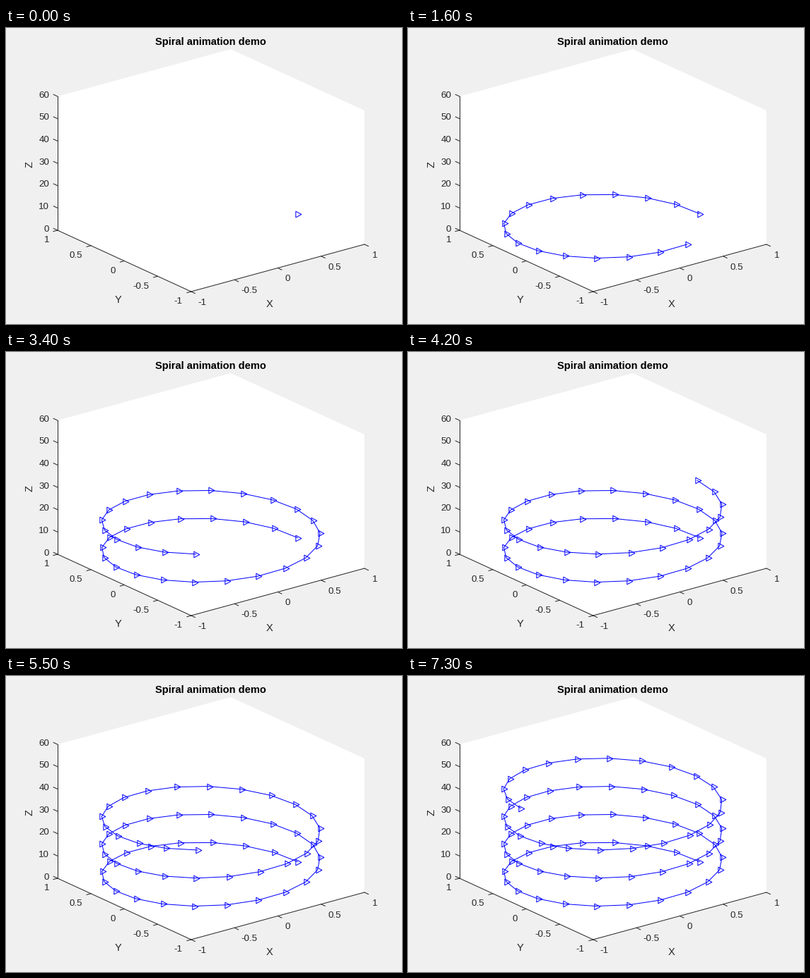
Write a matplotlib script that moves like this. It is 560 px wide and 420 px high and loops after 7400 ms.

```python
import numpy as np
import matplotlib.pyplot as plt
from matplotlib.animation import FuncAnimation
from matplotlib.markers import MarkerStyle
from matplotlib.patches import Polygon
from matplotlib.path import Path

W, H, DPI = 560, 420, 100
PX = 72 / DPI                      # points per pixel
FRAMES, INTERVAL = 74, 100
STEP = 0.3                         # radians between spiral points
INK = "#262626"

plt.rcParams["font.family"] = "Liberation Sans"
fig = plt.figure(figsize=(W / DPI, H / DPI), dpi=DPI, facecolor="#f0f0f0")
ax = fig.add_axes([0, 0, 1, 1])
ax.set(xlim=(0, W), ylim=(H, 0))
ax.axis("off")


def project(x, y, z):
    """Orthographic view of the data box, in pixels."""
    return (289.8 + 122.5 * x - 94.5 * y,
            297 - 33.5 * x - 43.5 * y - 190 / 60 * z)


def line(xs, ys, color=INK, width=1.0, **kw):
    return ax.plot(xs, ys, color=color, lw=width * PX, **kw)[0]


def label(x, y, text, size=13.33, **kw):
    kw = {"color": INK, "ha": "center", "va": "baseline"} | kw
    return ax.text(x, y, text, fontsize=size * PX, **kw)


def edge(a, b):
    line(*zip(project(*a), project(*b)), solid_capstyle="projecting")


def tick(point, dx, dy):
    x, y = project(*point)
    line([x, x + dx], [y, y + dy])


def draw_box():
    low, high = (-1, 1, 0), (-1, 1, 60)
    front, right = (-1, -1, 0), (1, -1, 0)
    outline = [high, (1, 1, 60), (1, -1, 60), right, front, low]
    ax.add_patch(Polygon([project(*c) for c in outline], fc="white", lw=0))
    for a, b in ((low, high), (low, front), (front, right)):
        edge(a, b)

    for k in range(7):
        tick((-1, 1, 10 * k), -5.6, -2.6)
        label(61, 288.6 - 190 / 6 * k, f"{10 * k}", ha="right")
    for k in range(5):
        v = k / 2 - 1
        tick((v, -1, 0), 5.6, 2.6)
        label(271.2 + 61.6 * k, 393 - 16.8 * k, f"{v:g}", ha="left")
        tick((-1, v, 0), -5.9, 1.6)
        label(249 - 47 * k, 391.4 - 21.75 * k, f"{v:g}", ha="right")

    label(373, 395.5, "X", 14.67)
    label(159, 390.4, "Y", 14.67)
    label(41, 193, "Z", 14.67, rotation=90, va="center", ha="right")
    label(289.5, 24, "Spiral animation demo", 14.67,
          color="black", weight="bold", zorder=6)


def draw_toolbar():
    """Faint row of axes tools; returns its artists."""
    parts = []
    y = 20

    def stroke(xs, ys):
        parts.append(line(xs, ys, color="#d6d6d6", width=1.3, zorder=5))

    def ring(x, y, r, sides=40, turn=0):
        a = np.linspace(0, 2 * np.pi, sides + 1) + turn
        stroke(x + r * np.cos(a), y + r * np.sin(a))

    def square(x, y, half):
        ring(x, y, half * 2 ** 0.5, 4, np.pi / 4)

    def export(x):
        square(x, y + 2, 5)
        stroke([x, x], [y - 7, y + 2])

    def brush(x):
        square(x, y - 4, 2.5)
        ring(x, y + 3, 6, 3, -np.pi / 2)

    def data_tip(x):
        square(x, y, 7)
        for dy in (-2.5, 2.5):
            stroke([x - 4, x + 4], [y + dy, y + dy])

    def rotate(x):
        ring(x, y, 7)
        ring(x, y, 4, 6, np.pi / 2)

    def pan(x):
        ring(x, y + 3, 4.5)
        for k in range(-2, 3):
            stroke([x + 1.5 * k, x + 2.8 * k], [y, y - 7 + abs(k)])

    def zoom_out(x):
        ring(x - 1.5, y - 1.5, 5.5)
        stroke([x + 2.5, x + 7.5], [y + 2.5, y + 7.5])
        stroke([x - 4.5, x + 1.5], [y - 1.5, y - 1.5])

    def zoom_in(x):
        zoom_out(x)
        stroke([x - 1.5, x - 1.5], [y - 4.5, y + 1.5])

    def home(x):
        stroke([x - 8, x, x + 8], [y, y - 7.5, y])
        square(x, y + 2, 5)

    tools = (export, brush, data_tip, rotate, pan, zoom_in, zoom_out, home)
    for k, tool in enumerate(tools):
        tool(357.5 + 20 * k)
    return parts


draw_box()
toolbar = draw_toolbar()

# Triangle pivoting on its centroid, so the tip reaches further than the base.
tip = 16 / 3
arrow = Path([(-tip / 2, 4.3), (tip, 0), (-tip / 2, -4.3), (-tip / 2, 4.3)],
             closed=True)
spiral = line([], [], color="blue", zorder=4,
              marker=MarkerStyle(arrow, joinstyle="miter"),
              markersize=2 * tip * PX, mfc="none", mec="blue", mew=PX)

t = STEP * np.arange(FRAMES)
px, py = project(np.cos(t), np.sin(t), 2 * t)


def update(i):
    spiral.set_data(px[:i + 1], py[:i + 1])
    glow = max(0, 1 - abs(i - 22) / 2)
    for part in toolbar:
        part.set_alpha(glow)
        part.set_visible(glow > 0)
    return [spiral, *toolbar]


anim = FuncAnimation(fig, update, frames=FRAMES, interval=INTERVAL,
                     repeat=True, repeat_delay=0, blit=False)
plt.show()
```
